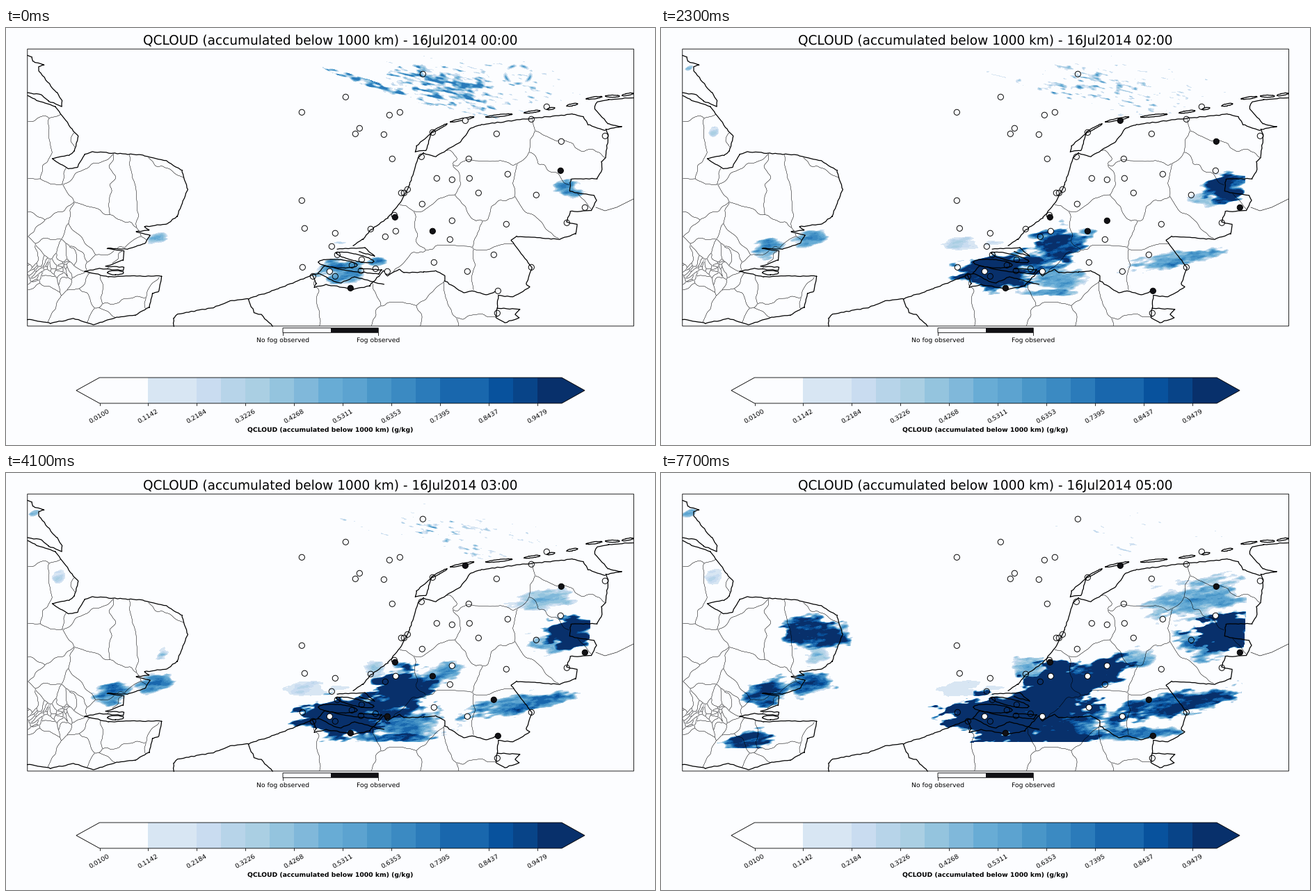
Animation of 933x600 px, one loop 8 s. Source, as a matplotlib script:

```python
import numpy as np
import matplotlib.pyplot as plt
from matplotlib.animation import FuncAnimation
from matplotlib.colors import to_rgba
from matplotlib.patches import Polygon
from matplotlib.path import Path

W, H, DPI = 933, 600, 64
PX = 72 / DPI  # points per pixel
PAPER, INK = "#fcfdff", "#111115"
LEFT, TOP, RIGHT, BOTTOM = 31, 30, 903, 429
STEP_MS, LOOP_MS, HOURS = 100, 8000, 6
PALETTE = [PAPER, PAPER, "#d8e6f3", "#d8e6f3", "#c9dcf0", "#b7d4e9", "#aacfe3",
           "#94c4de", "#80b8da", "#68acd5", "#5ca3d0", "#4996c8", "#3b8ac2",
           "#2b7bba", "#1967ad", "#1967ad", "#08529d", "#084488", "#08306b"]
LEVEL = 0.99 / len(PALETTE)

plt.rcParams.update({"font.family": "DejaVu Sans", "text.hinting": "none"})
fig = plt.figure(figsize=(W / DPI, H / DPI), dpi=DPI, facecolor=PAPER)
ax = fig.add_axes([0, 0, 1, 1])
ax.set_xlim(0, W)
ax.set_ylim(H, 0)
ax.axis("off")
rng = np.random.default_rng(7)
YY, XX = np.mgrid[TOP:BOTTOM, LEFT:RIGHT] + 0.5
fields = np.zeros((HOURS,) + XX.shape)


# ---- noise ----
def turn(dx, dy, degrees):
    c, s = np.cos(np.radians(degrees)), np.sin(np.radians(degrees))
    return dx * c + dy * s, dy * c - dx * s


def value_noise(seed, sx, sy, degrees=0):
    grid = np.random.default_rng(seed).random((256, 256))
    u, v = turn(XX, YY, degrees)
    u, v = u / sx, v / sy
    i, j = np.floor(u).astype(int), np.floor(v).astype(int)
    a, b = u - i, v - j
    a, b = a * a * (3 - 2 * a), b * b * (3 - 2 * b)
    at = lambda p, q: grid[(j + q) % 256, (i + p) % 256]
    return ((at(0, 0) * (1 - a) + at(1, 0) * a) * (1 - b)
            + (at(0, 1) * (1 - a) + at(1, 1) * a) * b)


def fractal(seed, sx, sy, degrees=0):
    parts = [value_noise(seed + k, sx / 2**k, sy / 2**k, degrees) for k in range(3)]
    return (parts[0] + 0.6 * parts[1] + 0.4 * parts[2]) / 2


# ---- cloud water ----
EDGE = 1.3 * (fractal(11, 26, 9, -8) - 0.5)
GRAIN = 0.5 + fractal(31, 22, 7, -8)


def cloud(x, y, rx, ry, degrees, onset, rate):
    """Ragged ellipse that spreads to rx, ry and thickens by rate each hour."""
    u, v = turn(XX - x, YY - y, degrees)
    for hour in range(onset, HOURS):
        age = hour - onset + 1
        size = (age / (HOURS - onset)) ** 0.45
        d = np.clip(np.hypot(u / rx, v / ry) / size + EDGE, 0, 1)
        np.maximum(fields[hour], (0.35 + rate * age) * (1 - d**5) * GRAIN, out=fields[hour])


def streaks(x, y, rx, ry, degrees, cut, rise):
    """Fine wave-like bands inside an ellipse, thinning out every hour."""
    u, v = turn(XX - x, YY - y, degrees)
    d = np.hypot(u / rx, v / ry)
    for hour in range(HOURS):
        bands = (0.7 * value_noise(60 + hour, 11, 2.8, 13)
                 + 0.3 * value_noise(80 + hour, 5, 2, 13))
        value = np.clip((bands - cut - rise * hour - 0.25 * d**2) * 1.9, 0, 0.7) * (d < 1)
        np.maximum(fields[hour], value, out=fields[hour])


# delta and river country
cloud(485, 351, 77, 37, 0, 0, .3)
cloud(533, 337, 30, 16, -20, 0, .22)
cloud(572, 316, 64, 44, -8, 1, .3)
cloud(622, 287, 56, 24, -15, 3, .3)
cloud(532, 284, 28, 20, 20, 3, .07)
cloud(613, 292, 24, 9, 0, 1, .13)
cloud(686, 264, 30, 17, -20, 4, .1)
cloud(578, 362, 90, 28, 0, 2, .14)
cloud(548, 381, 92, 11, 0, 2, .3)
# south-eastern band
cloud(735, 334, 112, 17, -11, 1, .13)
cloud(680, 376, 66, 9, -5, 4, .15)
# eastern border
cloud(808, 232, 50, 29, 0, 0, .26)
cloud(782, 246, 44, 24, 0, 2, .1)
cloud(770, 182, 70, 31, -12, 3, .06)
# western shore
cloud(219, 231, 48, 26, 0, 4, .35)
cloud(224, 262, 24, 14, -40, 3, .03)
cloud(215, 303, 38, 16, -15, 0, .08)
cloud(157, 316, 34, 19, -15, 1, .11)
cloud(130, 385, 38, 15, -10, 4, .4)
cloud(40, 58, 11, 6, -30, 2, .03)
cloud(77, 148, 14, 13, -30, 2, -.02)
# open water
cloud(430, 312, 40, 15, 0, 1, -.04)
cloud(480, 309, 26, 6, 0, 0, -.03)
# northern sea
streaks(627, 84, 82, 29, 10, .3, .085)
streaks(535, 84, 85, 5, 19, .2, .15)
streaks(670, 108, 66, 20, 10, .45, .05)
streaks(680, 82, 180, 50, 4, .62, .03)

ring = np.abs(np.hypot((XX - 736) / 18, (YY - 67) / 13) - 1)
ring_beads = 0.6 + 0.5 * np.sin(5 * np.arctan2(YY - 67, XX - 736))
np.maximum(fields[0], np.clip(0.6 - 2.6 * ring, 0, 1) * ring_beads, out=fields[0])

inside = (XX < 850 - 0.053 * (YY - 30)) & (YY < np.interp(XX, [130, 450], [396.5, 387.5]))
colours = np.array([to_rgba(c) for c in PALETTE])
colours[:2, 3] = 0
index = np.clip((fields * inside - 0.01) / LEVEL, 0, len(PALETTE) - 1).astype(int)
clouds = (colours[index] * 255).astype(np.uint8)
cloud_image = ax.imshow(clouds[0], extent=(LEFT, RIGHT, BOTTOM, TOP), aspect="auto",
                        interpolation="nearest", zorder=1)


# ---- coasts and borders ----
def coast(*xy, wobble=0.6):
    """Draw key points joined by slightly rough lines; return the key points."""
    points = np.reshape(xy, (-1, 2)).astype(float)
    step = np.hypot(*np.diff(points, axis=0).T)
    along = np.r_[0, np.cumsum(step)]
    t = np.union1d(along, np.arange(0, along[-1], 4))
    x, y = (np.interp(t, along, p) + rng.uniform(-wobble, wobble, len(t)) for p in points.T)
    ax.plot(x, y, color="black", lw=1.25 * PX, zorder=2)
    return points


def loop(x0, y0, x1, y1, width):
    """Slim closed outline of an island or inlet."""
    t = np.linspace(0, 2 * np.pi, 17)
    u, v = (1 - np.cos(t)) / 2, np.sin(t) * width / 2
    coast(*np.c_[x0 + (x1 - x0) * u, y0 + (y1 - y0) * u + v].ravel(), wobble=0.3)


def districts(outline, sites):
    """Thin borders halfway between neighbouring sites, kept inside an outline."""
    grid = np.s_[::2, ::2]
    x, y = (XX + WARP_X)[grid], (YY + WARP_Y)[grid]
    spots = np.c_[XX[grid].ravel(), YY[grid].ravel()]
    land = Path(outline).contains_points(spots).reshape(x.shape)
    distance = np.array([np.hypot(x - a, y - b) for a, b in sites])
    first, second = np.partition(distance, 1, axis=0)[:2]
    for d in distance:
        gap = np.ma.array(d - np.where(d == first, second, first), mask=~land)
        if land.any() and gap.min() < 0:
            ax.contour(XX[grid], YY[grid], gap, [0], colors="black",
                       linewidths=0.3 * PX, zorder=2)


WARP_X, WARP_Y = (30 * (fractal(seed, 36, 36) - 0.5) for seed in (41, 51))

coast(31, 40, 37, 42, 39, 48, 55, 53, 47, 56, 47, 62, 73, 93, 81, 105, 80, 113,
      61, 105, 50, 96, 31, 93)
anglia = coast(31, 97, 44, 104, 71, 113, 97, 148, 104, 156, 98, 177, 91, 183, 66, 188,
               90, 203, 102, 201, 113, 182, 124, 178, 197, 183, 230, 191, 253, 205,
               261, 232, 246, 271, 231, 282, 199, 286, 206, 291, 187, 293, 207, 298,
               200, 310, 175, 318, 145, 317, 170, 321, 168, 334, 143, 343)
kent = coast(143, 343, 170, 344, 168, 349, 134, 346, 113, 350, 147, 358, 180, 357, 224, 357,
             220, 379, 211, 382, 206, 402, 186, 413, 160, 416, 125, 427, 98, 418, 64, 425, 31, 419)
flanders = coast(241, 429, 241, 418, 246, 412, 299, 402, 322, 393, 347, 390, 390, 376,
                 441, 355, 450, 353, 470, 364, 482, 367, 500, 358, 543, 369)
coast(348, 390, 357, 410, 366, 412, 383, 429)
holland = coast(513, 304, 525, 290, 549, 273, 568, 250, 580, 225, 593, 186, 600, 180,
                618, 185, 653, 164, 668, 144, 684, 139, 745, 131, 815, 124, 829, 127,
                837, 139, 861, 147)
ems = coast(902, 100, 866, 103, 849, 107, 846, 116, 866, 138, 885, 142, 862, 146, 866, 155,
            862, 186, 856, 192, 857, 204, 850, 217, 812, 217, 810, 235, 845, 241, 849, 248,
            841, 263, 811, 264, 806, 279, 821, 283, 819, 296, 796, 304, 734, 300, 726, 305,
            756, 345, 748, 368, 753, 373, 728, 387, 708, 385)
coast(708, 385, 706, 403, 739, 405, 732, 412, 738, 417, 717, 424, 704, 417, 706, 403)
belgium = coast(441, 356, 446, 367, 443, 373, 460, 369, 500, 376, 523, 371, 543, 349,
                548, 357, 565, 347, 572, 352, 601, 351, 618, 349, 631, 357, 631, 364,
                658, 381, 670, 378, 691, 384, 708, 378)
# delta islands
coast(449, 352, 458, 342, 490, 349, 536, 354, 540, 348, 508, 346)
loop(449, 337, 505, 341, 12)
loop(475, 324, 529, 336, 10)
coast(476, 318, 516, 316, 530, 328, 508, 322)
coast(499, 313, 513, 304)
# barrier islands and an inlet
loop(146, 352, 169, 352, 6)
coast(589, 178, 590, 170, 611, 151, 604, 176, 589, 178)
for x0, y0, x1, y1 in ((612, 150, 634, 138), (639, 135, 673, 128), (690, 128, 728, 124),
                       (745, 122, 768, 119), (778, 117, 789, 115), (806, 112, 822, 109),
                       (834, 102, 857, 99), (862, 98, 882, 98), (886, 97, 902, 94)):
    loop(x0, y0, x1, y1, 3)

counties = rng.uniform((20, 90), (250, 430), (22, 2))
boroughs = rng.normal((60, 343), (20, 10), (45, 2))
districts(np.r_[anglia, kent], np.r_[counties, boroughs])
districts(np.r_[holland, ems[6:], belgium[:5:-1]],
          [(820, 140), (695, 160), (805, 190), (770, 235), (690, 225), (605, 230),
           (622, 278), (725, 280), (560, 295), (620, 345), (730, 345)])
districts(np.r_[flanders[5:9], belgium, [(708, 429), (360, 429)]],
          [(400, 410), (490, 400), (570, 375), (565, 420), (615, 425), (680, 400), (680, 430)])
coast_end = np.array([(848, 258), (861, 263), (878, 258), (902, 246)])
ax.plot(*coast_end.T, color="black", lw=0.6 * PX, zorder=2)


# ---- stations ----
SILENT = [(599, 66), (488, 99), (425, 121), (551, 125), (566, 121), (508, 144), (502, 152),
          (543, 153), (555, 188), (425, 248), (429, 288), (473, 295), (468, 314), (476, 326),
          (426, 344), (441, 357), (473, 357), (497, 341), (510, 349), (531, 346), (511, 333),
          (524, 289), (545, 300), (558, 269), (568, 237), (572, 237), (577, 232), (598, 253),
          (597, 185), (613, 150), (705, 152), (755, 131), (777, 113), (861, 155), (665, 188),
          (619, 216), (641, 218), (666, 216), (762, 240), (806, 280), (638, 304), (755, 344),
          (706, 410)]
FOG_HOURS = {(660, 133): "2345", (798, 163): "12345", (797, 205): "01", (832, 258): "12345",
             (559, 272): "02345", (641, 277): "2", (719, 282): "4", (613, 292): "0123",
             (548, 350): "3", (701, 326): "345", (495, 374): "012345", (707, 378): "12345",
             (465, 350): "", (560, 292): "", (615, 337): "", (663, 350): "",
             (679, 237): "", (721, 210): ""}


def circles(points, face):
    x, y = np.array(points).T
    return ax.scatter(x + 0.3, y + 0.3, s=(8.2 * PX) ** 2, facecolors=face,
                      edgecolors="black", linewidths=0.95 * PX, zorder=4)


circles(SILENT, "none")
stations = circles(list(FOG_HOURS), PAPER)


# ---- frame and legends ----
def text(x, y, string, size=9.26, **style):
    return ax.text(x, y, string, fontsize=size * PX, ha="center", **style)


def box(x0, y0, x1, y1):
    return [(x0, y0), (x1, y0), (x1, y1), (x0, y1)]


def shape(points, colour):
    ax.add_patch(Polygon(points, color=colour, lw=0))


def outline(points):
    ax.add_patch(Polygon(points, fill=False, lw=0.85 * PX, zorder=3, snap=False))


def tick(x, y):
    ax.plot([x, x], [y, y + 3.2], color="black", lw=0.8 * PX, zorder=3)


outline(box(30.8, 30.2, 902.4, 428.9))

shape(box(466.5, 431.7, 535.3, 438.3), INK)
outline(box(398, 431.7, 535.3, 438.3))
for x, label in ((398, "No fog observed"), (535, "Fog observed")):
    tick(x, 438.3)
    text(x, 452, label)

BAR_X, BAR_TOP, BAR_BOTTOM, CELL = 134.5, 503, 540, 34.97
bar_end, bar_mid = BAR_X + CELL * len(PALETTE), (BAR_TOP + BAR_BOTTOM) / 2
for k, colour in enumerate(PALETTE):
    x = BAR_X + k * CELL
    shape(box(x, BAR_TOP, x + CELL, BAR_BOTTOM), colour)
    if k % 2 == 0:
        tick(x, BAR_BOTTOM)
        text(x, 558.5, f"{0.01 + k * LEVEL:.4f}", rotation=30, va="center")
shape([(bar_end, BAR_TOP), (832, bar_mid), (bar_end, BAR_BOTTOM)], PALETTE[-1])
outline([(BAR_X, BAR_TOP), (bar_end, BAR_TOP), (832, bar_mid), (bar_end, BAR_BOTTOM),
         (BAR_X, BAR_BOTTOM), (101, bar_mid)])
text(466.5, 581.5, "QCLOUD (accumulated below 1000 km) (g/kg)", weight="bold")
title = text(466.6, 24.2, "", 18.52)


def update(i):
    hour = (i * STEP_MS + 1300) // 1800
    cloud_image.set_data(clouds[hour])
    stations.set_facecolor([INK if str(hour) in hours else PAPER
                            for hours in FOG_HOURS.values()])
    title.set_text(f"QCLOUD (accumulated below 1000 km) - 16Jul2014 {hour:02d}:00")
    return cloud_image, stations, title


anim = FuncAnimation(fig, update, frames=LOOP_MS // STEP_MS, interval=STEP_MS,
                     repeat=True, repeat_delay=0, blit=False)
plt.show()
```
